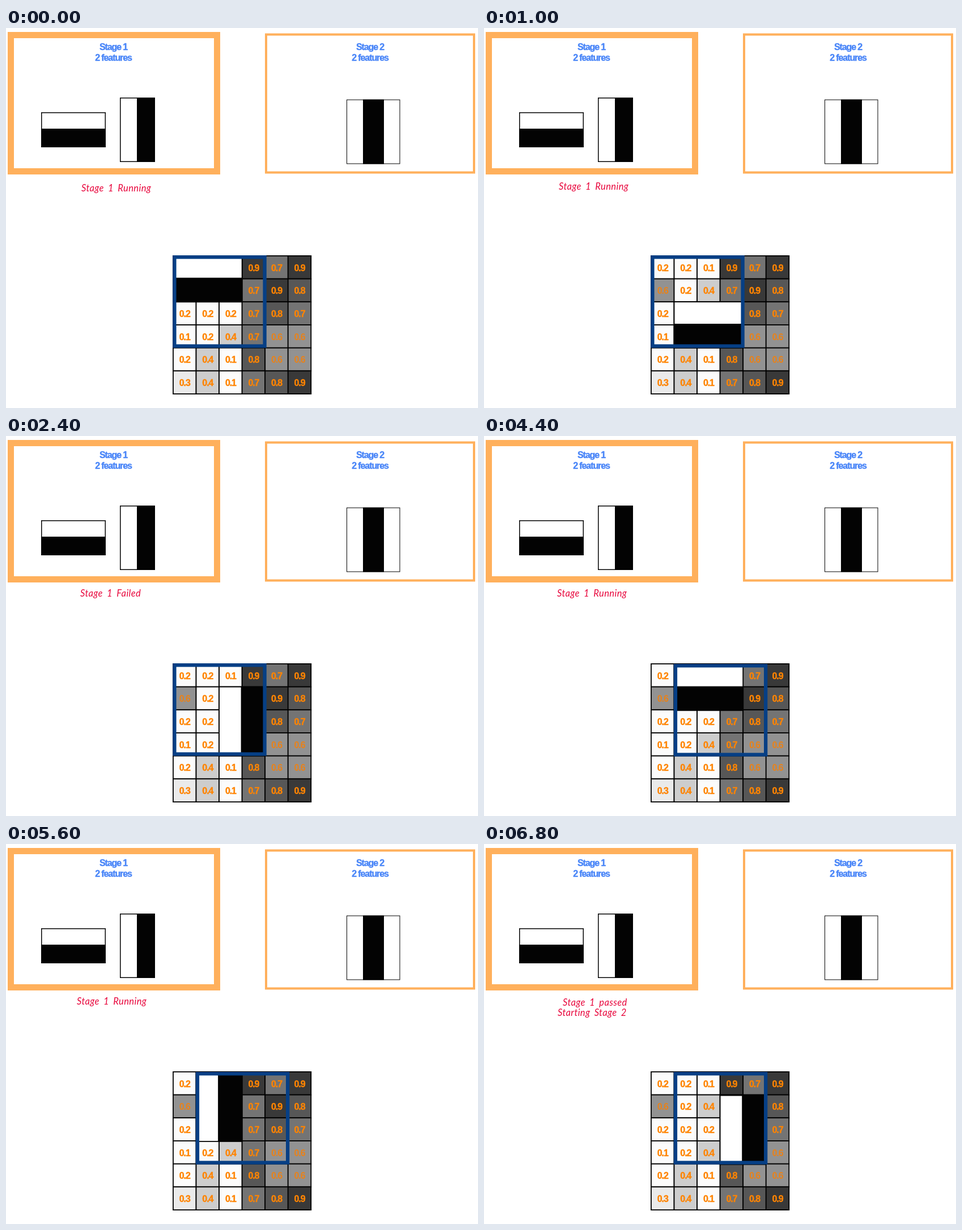
An HTML page for the animation above (8000 ms loop, 833 by 672 pixels).

```html
<!DOCTYPE html>
<html lang="en">
<head>
<meta charset="utf-8">
<title>Cascade stages</title>
<style>
  html, body { margin: 0; width: 100%; height: 100%; overflow: hidden; background: #fff; }
  svg { display: block; width: 833px; height: 672px; }
  .bold { font: bold 16px "Liberation Sans", Arial, sans-serif; letter-spacing: -1.1px; text-anchor: middle; stroke-width: .4px; }
  .title { fill: #4a86f8; stroke: #4a86f8; }
  .num { fill: #ff8400; stroke: #ff8400; }
  .dim { fill: #e8821a; stroke: none; }
  .status { font: italic 16.5px Lato, "Open Sans", sans-serif; letter-spacing: .4px; word-spacing: 3px; fill: #e8063c; }
</style>
</head>
<body>
<svg id="stage" viewBox="0 0 833 672"></svg>
<script>
const stage = document.getElementById("stage");
const black = "#030303";
const orange = "#ffb05c";

function set(el, attrs) {
  for (const key in attrs) el.setAttribute(key, attrs[key]);
}

function add(tag, attrs = {}, text = "") {
  const el = document.createElementNS("http://www.w3.org/2000/svg", tag);
  set(el, attrs);
  el.textContent = text;
  return stage.appendChild(el);
}

// Edges in, attributes out
function box(x1, y1, x2, y2) {
  return { x: x1, y: y1, width: x2 - x1, height: y2 - y1 };
}

// A border drawn inside the given edges
function frame(x1, y1, x2, y2, line, stroke, fill = "none") {
  const half = line / 2;
  add("rect", { ...box(x1 + half, y1 + half, x2 - half, y2 - half), fill, stroke, "stroke-width": line });
}

function block(x1, y1, x2, y2) {
  add("rect", { ...box(x1, y1, x2, y2), fill: black });
}

function title(x, name) {
  [name, "2 features"].forEach((text, i) => add("text", { x, y: 39 + i * 18.5, class: "bold title" }, text));
}

// Stage panels
frame(3, 7, 378, 259, 11, orange);
frame(457, 9.5, 828, 257.5, 4, orange);
title(189.5, "Stage 1");
title(642.5, "Stage 2");
frame(62, 149, 176, 211, 1.5, black, "#fff");
block(62, 178, 176, 211);
frame(201, 123, 263, 237, 1.5, black, "#fff");
block(231, 123, 263, 237);
frame(601, 126.5, 695.5, 240.5, 1, black, "#fff");
block(630, 126.5, 667, 240.5);

// Pixel grid: each digit is a tenth of darkness
const rows = ["221979", "624798", "222787", "124766", "241866", "341789"];
const colX = c => 295 + c * 40.55;
const rowY = r => 402.9 + r * 40.7;

function eachCell(fn) {
  rows.forEach((row, r) => [...row].forEach((digit, c) => fn(digit, c, r)));
}

eachCell((digit, c, r) => {
  const v = Math.min(251, 322.5 - 29.5 * digit);
  add("rect", {
    ...box(colX(c), rowY(r), colX(c + 1), rowY(r + 1)),
    fill: `rgb(${v},${v},${v})`, stroke: "#000", "stroke-width": 1.8
  });
});
eachCell((digit, c, r) => add("text", {
  x: colX(c) + 20.3, y: rowY(r) + 26.6, class: "bold num" + (digit === "6" ? " dim" : "")
}, "0." + digit));

// Moving feature, search window and status
const dark = add("rect", { fill: black });
const light = add("rect", { fill: "#fff" });
const scan = add("rect", { fill: "none", stroke: "#063f85", "stroke-width": 6.3 });
const lines = [0, 1].map(() => add("text", { class: "status" }));

// Six places for the wide feature, then six for the tall one
function place(win, step) {
  const wide = step < 6;
  const [w, h] = wide ? [3, 2] : [2, 3];
  const spots = 5 - w;
  const c = win + step % spots;
  const r = Math.floor(step % 6 / spots);
  const x1 = colX(c), y1 = rowY(r) + win;
  const x2 = colX(c + w), y2 = rowY(r + h) + win;
  set(dark, box(x1 - .9, y1 - .9, x2 + .9, y2 + .9));
  set(light, wide
    ? box(x1 + .9, y1 + .9, x2 - .9, rowY(r + 1) + win - 2)
    : box(x1 + .9, y1 + .9, colX(c + 1) - 2, y2 - .9));
  set(scan, box(colX(win) + 2.4, rowY(0) + 2.3 + win, colX(win + 4) - .6, rowY(4) - 3.2 + win));
}

// The status wanders sideways between these [time, x] points
const drift = [[0, 133], [600, 120], [1000, 132], [1800, 118], [2400, 131], [4400, 129], [5200, 124], [6000, 126], [6800, 128]];

function driftX(t) {
  const i = Math.max(1, drift.findIndex(([time]) => time >= t));
  const [[t0, x0], [t1, x1]] = [drift[i - 1], drift[i]];
  return x0 + (x1 - x0) * (t - t0) / (t1 - t0);
}

function say(line, text, x, y) {
  line.textContent = text;
  set(line, { x, y });
}

const turn = 4400;
const tick = 200;

function draw(time) {
  const t = time % 8000;
  const win = t < turn ? 0 : 1;
  const step = Math.min(12, Math.floor((t - win * turn) / tick));
  const done = step === 12;
  place(win, Math.min(step, 11));
  if (win && done) {
    say(lines[0], "Stage 1 passed", 139, 285.5);
    say(lines[1], "Starting Stage 2", 130, 304);
  } else {
    const at = win * turn + step * tick;
    say(lines[0], done ? "Stage 1 Failed" : "Stage 1 Running", driftX(at), Math.max(283.5, 289 - at * .003));
    say(lines[1], "", 0, 0);
  }
}

let start;
function loop(now) {
  start ??= now;
  draw(now - start);
  requestAnimationFrame(loop);
}
draw(0);
requestAnimationFrame(loop);
</script>
</body>
</html>
```
